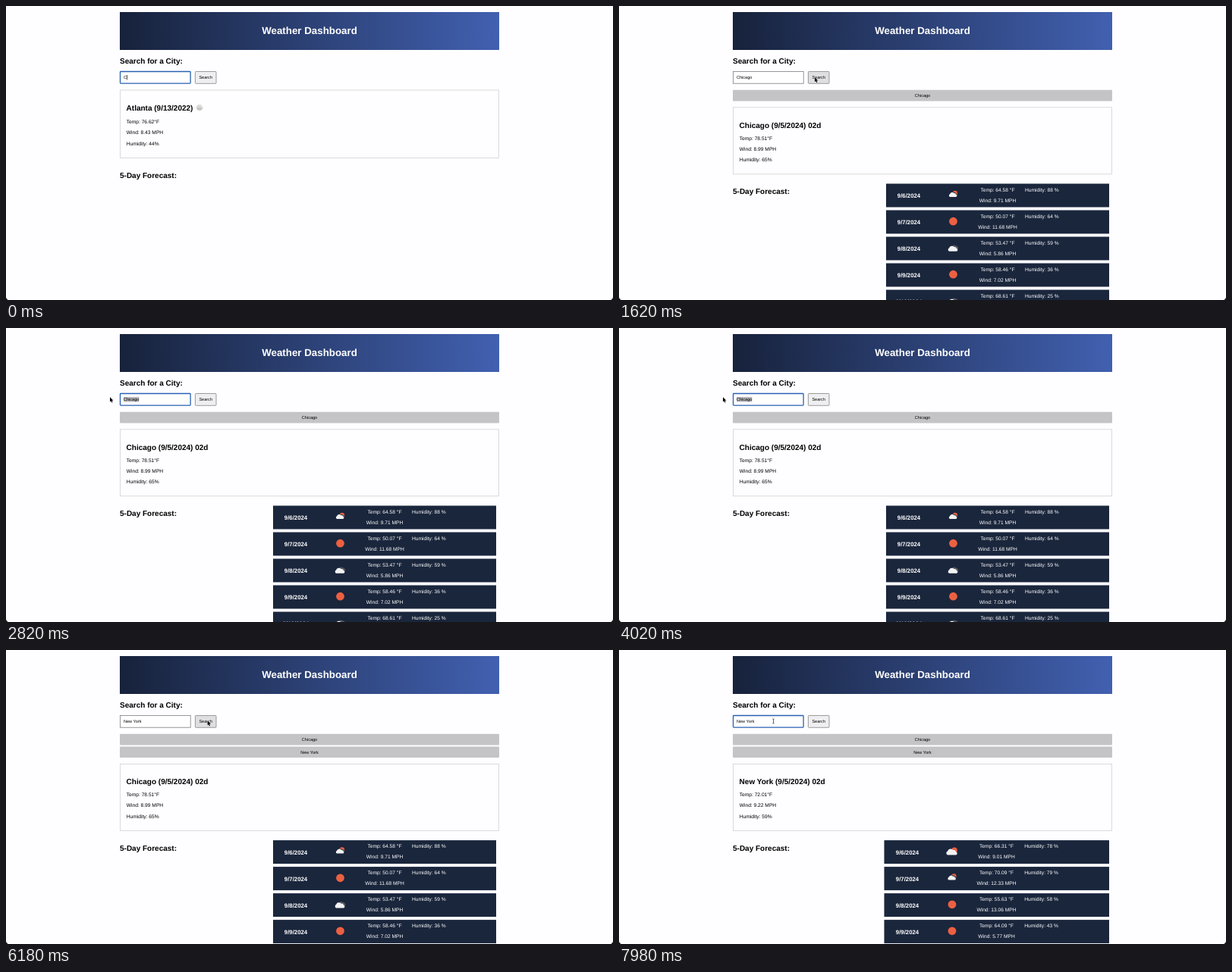
Write an HTML page that moves like this. It is 800 by 388 pixels and loops after 8 s.

```html
<!DOCTYPE html>
<html lang="en">
<head>
<meta charset="utf-8">
<title>Weather Dashboard</title>
<style>
  html, body { margin: 0; width: 100%; height: 100%; overflow: hidden; background: #fefdff; }
  svg { display: block; width: 800px; height: 388px; }
  text { font-family: "Liberation Sans", Arial, sans-serif; font-size: 6.667px; white-space: pre; text-rendering: geometricPrecision; }
  .h1 { font-size: 13.333px; font-weight: bold; fill: #fff; }
  .h2 { font-size: 10px; font-weight: bold; }
  .h3 { font-size: 7.8px; font-weight: bold; }
  .ui { font-size: 5.556px; }
  .mid { text-anchor: middle; }
  #cards text { fill: #fff; }
</style>
</head>
<body>
<svg viewBox="0 0 800 388">
  <defs>
    <linearGradient id="sky"><stop stop-color="#17223b"/><stop offset="1" stop-color="#4160b0"/></linearGradient>
  </defs>
  <rect x="150" y="8" width="500" height="50" fill="url(#sky)"/>
  <text class="h1 mid" x="400" y="37.2">Weather Dashboard</text>
  <text class="h2" x="150" y="75.5">Search for a City:</text>

  <rect id="field" fill="#fff"/>
  <rect id="selection" y="91" height="6.4" fill="#b5b4b8"/>
  <text id="typed" class="ui" x="155" y="96.2"></text>
  <rect id="caret" y="91" width=".7" height="6.4"/>

  <rect id="button" x="249.4" y="86.5" width="27.6" height="15.8" rx=".8" stroke="#858487" stroke-width=".8"/>
  <text class="ui mid" x="263.2" y="96.2">Search</text>

  <g id="history"></g>
  <g id="result"></g>
  <text id="forecast" class="h2" x="150">5-Day Forecast:</text>
  <g id="cards"></g>

  <path d="M0 384.5V388H3Q.5 387.5 0 384.5ZM800 384.5V388H797Q799.5 387.5 800 384.5Z"/>
  <path id="arrow" d="M0 0V6.3L1.4 5L2.4 7.3L3.5 6.8L2.5 4.6H4.4Z" stroke="#fff" stroke-width=".7" paint-order="stroke"/>
  <path id="beam" d="M-1.2-3Q0-3 0-2.3Q0-3 1.2-3M0-2.3V2.3M-1.2 3Q0 3 0 2.3Q0 3 1.2 3" fill="none" stroke="#222" stroke-width=".7"/>
</svg>
<script>
const LOOP = 8000, STEP = 60;
const el = id => document.getElementById(id);
const set = (id, attrs) => { for (const k in attrs) el(id).setAttribute(k, attrs[k]); };
const show = (id, on) => { el(id).style.display = on ? '' : 'none'; };
const text = (cls, x, y, s) => `<text class="${cls}" x="${x}" y="${y}">${s}</text>`;

// Each day: date, icon, temperature, humidity, wind
const cities = {
  atlanta: { title: 'Atlanta (9/13/2022)', temp: '76.62', wind: '8.43', hum: 44, icon: true, days: [] },
  chicago: { title: 'Chicago (9/5/2024) 02d', temp: '78.51', wind: '8.99', hum: 65, left: 352, date: 382, days: [
    ['9/6/2024', 'rain', '64.58', 88, '9.71'],
    ['9/7/2024', 'sun', '50.07', 64, '11.68'],
    ['9/8/2024', 'cloud', '53.47', 59, '5.86'],
    ['9/9/2024', 'sun', '58.46', 36, '7.02'],
    ['9/10/2024', 'cloud', '68.61', 25, '6.24']] },
  newYork: { title: 'New York (9/5/2024) 02d', temp: '72.01', wind: '9.22', hum: 59, left: 349.5, date: 380, days: [
    ['9/6/2024', 'partly', '66.31', 78, '9.01'],
    ['9/7/2024', 'rain', '70.09', 79, '12.33'],
    ['9/8/2024', 'sun', '55.63', 58, '13.06'],
    ['9/9/2024', 'sun', '64.09', 43, '5.77']] }
};

const puff = (fill, x, y, k) => `<path transform="translate(${x} ${y}) scale(${k})" fill="${fill}"
  d="M-4.2 3A2.2 2.2 0 0 1-4.2-1A3.2 3.2 0 0 1 1.4-2A2.4 2.4 0 0 1 4.3-.4A1.8 1.8 0 0 1 4.4 3Z"/>`;
const disc = (x, y, r) => `<circle cx="${x}" cy="${y}" r="${r}" fill="#ec6042"/>`;
const icons = {
  sun: disc(0, -.7, 5.4),
  partly: disc(3, -2.2, 3.8) + puff('#f3f3f3', -.5, .2, 1.3),
  rain: disc(2.4, -3, 3.2) + puff('#484a50', 1.4, -2.2, .7) + puff('#f3f3f3', -.4, -.8, .95),
  cloud: puff('#55575d', 2.2, -1.6, .85) + puff('#f3f3f3', -.5, .5, 1.15)
};
const paleIcon = `<g transform="translate(255 134.2)">
  <circle r="4" fill="#e9e6df" stroke="#d5d1c8" stroke-dasharray="1 1.1"/>
  ${puff('#d2d3d5', 0, -.2, .75)}
  <path d="M-1.6 1.2L-2 2.3M.2 1.2L-.2 2.8M1.9 1.2L1.5 2.3" stroke="#74767a" stroke-width=".7"/></g>`;

function card(city, [date, icon, temp, hum, wind], y) {
  const shift = (city.left - 352) * .6;
  return `<rect x="${city.left}" y="${y}" width="${646 - city.left}" height="31" fill="#1a263c"/>`
    + text('h3 mid', city.date, y + 18.8, date)
    + `<g transform="translate(${440.5 + shift} ${y + 15.4})">${icons[icon]}</g>`
    + text('mid', 499 + shift, y + 10, `Temp: ${temp} °F`)
    + text('mid', 557.4 + shift / 2, y + 10, `Humidity: ${hum} %`)
    + text('mid', 499 + shift, y + 24.1, `Wind: ${wind} MPH`);
}

let drawn = '';
function layout(name, count) {
  if (drawn === name + count) return;
  drawn = name + count;
  const city = cities[name];
  const top = count ? 117.2 + 16.6 * count : 111;
  const height = city.icon ? 89.5 : 88;
  const line = top + (city.icon ? 44.3 : 42.8);
  el('history').innerHTML = ['Chicago', 'New York'].slice(0, count).map((s, i) =>
    `<rect x="150" y="${110.8 + 16.6 * i}" width="500" height="14.6" rx=".8" fill="#c4c3c5"/>`
    + text('ui mid', 400, 120 + 16.6 * i, s)).join('');
  el('result').innerHTML =
    `<rect x="150.4" y="${top}" width="499.2" height="${height}" fill="none" stroke="#d2d1d3" stroke-width=".8"/>`
    + text('h2', 158.6, top + 26.7, city.title)
    + [`Temp: ${city.temp}°F`, `Wind: ${city.wind} MPH`, `Humidity: ${city.hum}%`]
      .map((s, i) => text('', 158.7, line + 14.15 * i, s)).join('')
    + (city.icon ? `<g transform="translate(0 ${top - 111})">${paleIcon}</g>` : '');
  const bottom = top + height;
  set('forecast', { y: bottom + 26.1 });
  el('cards').innerHTML = city.days.map((d, i) => card(city, d, bottom + 12.7 + 35 * i)).join('');
}

// [time, value]: the latest entry holds
const typing = [[0, 'C'], [60, 'Ch'], [120, 'Chi'], [180, 'Chic'], [240, 'Chica'], [360, 'Chicag'], [480, 'Chicago'],
  [4380, 'N'], [4440, 'Ne'], [4560, 'New'], [4680, 'New '], [5100, 'New Y'], [5160, 'New Yo'], [5220, 'New Yor'], [5340, 'New York']];
const weather = [[0, 'atlanta'], [1500, 'chicago'], [6240, 'newYork']];
const searches = [[0, 0], [1440, 1], [6180, 2]];
const focused = [[0, true], [1440, false], [2400, true], [6180, false], [7560, true]];
const blink = [[0, true], [1440, false], [4380, true], [4860, false], [5100, true], [5820, false]];
const at = (table, t) => table.filter(row => row[0] <= t).pop()[1];

// Pointer paths: [time, x, y]; hidden between them
const paths = [
  [[660, 200, 94], [960, 258, 94], [1560, 258, 94], [1920, 257, 94], [2280, 182, 94], [2400, 178, 94], [2580, 137, 91.2], [4380, 137, 91.2]],
  [[5640, 160, 84], [5820, 254.8, 70.2], [6120, 265.6, 93.2], [6720, 265.6, 93.2], [6960, 255, 131],
   [7260, 165, 112], [7500, 188, 97], [7740, 203.5, 94], [LOOP + STEP, 203.5, 94]]
];
function pointer(t) {
  const path = paths.find(p => t >= p[0][0] && t < p[p.length - 1][0]);
  if (!path) return null;
  const i = path.findIndex(p => p[0] > t);
  const [t0, x0, y0] = path[i - 1], [t1, x1, y1] = path[i];
  const u = (t - t0) / (t1 - t0), e = u * u * (3 - 2 * u);
  return { x: x0 + (x1 - x0) * e, y: y0 + (y1 - y0) * e };
}
const inside = (p, x0, x1) => !!p && p.x > x0 && p.x < x1 && p.y > 86 && p.y < 103;

function render(time) {
  const t = Math.floor(time / STEP) * STEP;
  const p = pointer(t), focus = at(focused, t);
  layout(at(weather, t), at(searches, t));

  const typed = el('typed'), value = at(typing, t);
  if (typed.textContent !== value) typed.textContent = value;
  const end = 155 + typed.getComputedTextLength();
  set('caret', { x: end + .2 });
  show('caret', at(blink, t));

  const selecting = t >= 2400 && t < 4380;
  show('selection', selecting);
  if (selecting) {
    const from = Math.min(end, Math.max(155, p.x));
    set('selection', { x: from, width: end - from });
  }
  set('field', focus
    ? { x: 150.5, y: 86.5, width: 92.6, height: 15.6, rx: .8, stroke: '#2862b4', 'stroke-width': 1.3 }
    : { x: 150.4, y: 86.4, width: 92.8, height: 15.8, rx: 0, stroke: '#7d7c80', 'stroke-width': .8 });
  set('button', { fill: inside(p, 249, 277) ? '#dfdee1' : '#efeef0' });

  const beam = inside(p, 150, 243);
  show('beam', beam);
  show('arrow', p && !beam);
  if (p) set(beam ? 'beam' : 'arrow', { transform: `translate(${p.x} ${p.y})` });
}

const start = performance.now();
function tick() {
  render((performance.now() - start) % LOOP);
  requestAnimationFrame(tick);
}
tick();
</script>
</body>
</html>
```
